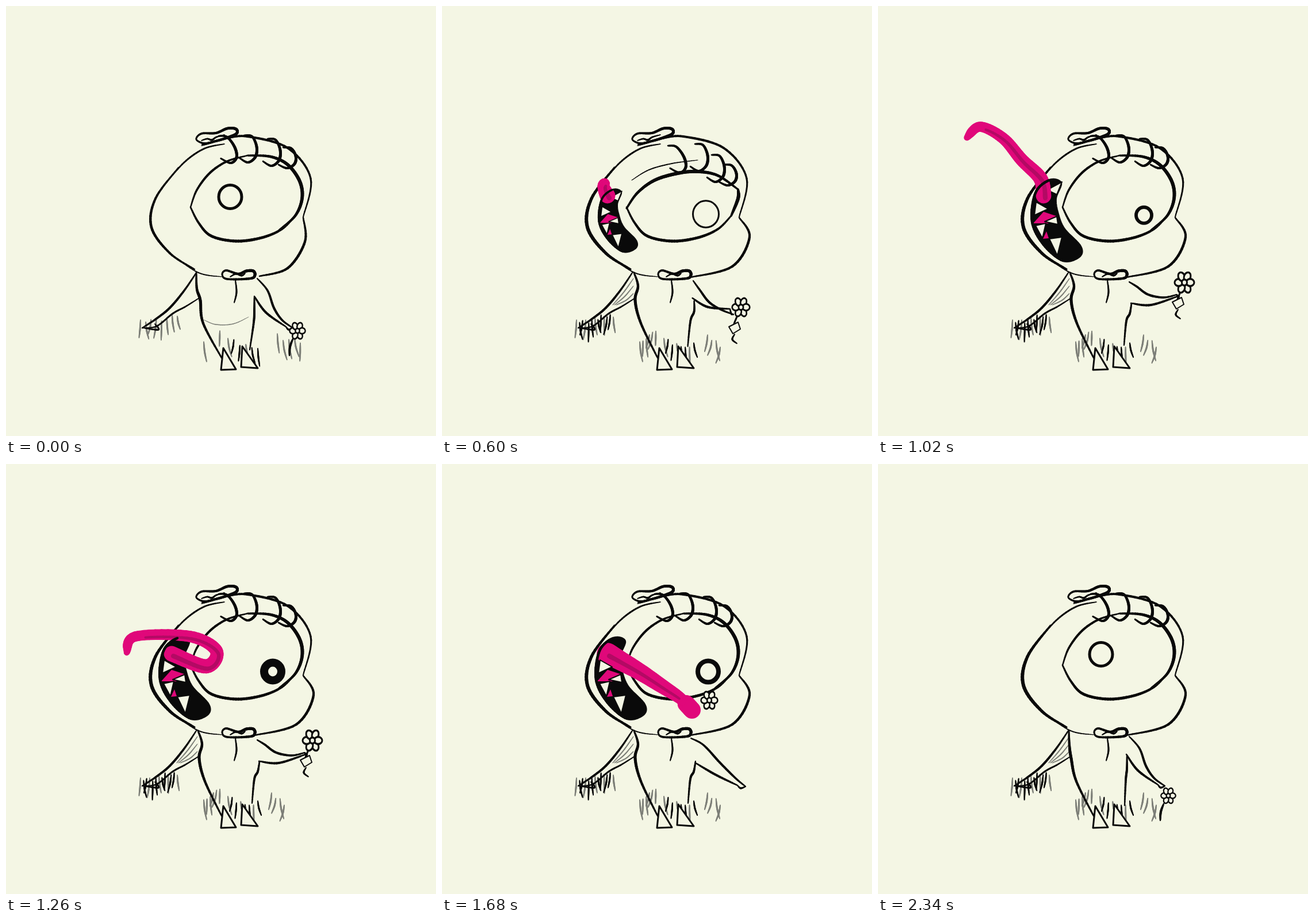
Animation of 748x748 px, one loop 2.4 s. Source, as an HTML page with a canvas:

```html
<!DOCTYPE html>
<html>
<head>
<meta charset="utf-8">
<style>
html, body { margin: 0; width: 100%; height: 100%; overflow: hidden; background: #f4f6e4; }
canvas { display: block; }
</style>
</head>
<body>
<canvas id="stage" width="748" height="748"></canvas>
<script>
const ctx = document.getElementById('stage').getContext('2d');
const LOOP = 2400, STEP = 60;
const PAPER = '#f4f6e4', INK = '#0a0a0a', GREY = '#7d7f78', PINK = '#e0087a', PLUM = '#b30a64';

const numbers = text => text.split(/[ ,]+/).map(Number);
const lerp = (a, b, k) => a + (b - a) * k;

function points(source) {
  const flat = typeof source === 'string' ? numbers(source) : source;
  return Array.from({ length: flat.length / 2 }, (_, i) => [flat[2 * i], flat[2 * i + 1]]);
}

// Eased blend of number lists, given as [time, list] pairs
function tween(keys, t) {
  const next = keys.findIndex(([time]) => time > t);
  if (next < 1) return numbers(keys[next ? keys.length - 1 : 0][1]);
  const [[t0, a], [t1, b]] = keys.slice(next - 1, next + 1);
  const u = (t - t0) / (t1 - t0), k = u * u * (3 - 2 * u), to = numbers(b);
  return numbers(a).map((v, i) => lerp(v, to[i], k));
}

// Catmull-Rom samples through the points
function curve(source) {
  const p = points(source), last = p.length - 1, steps = 10;
  const closed = p[0].join() === p[last].join();
  const out = [p[0]];
  for (let i = 0; i < last; i++) {
    const a = p[i - 1] || p[closed ? last - 1 : i];
    const b = p[i], c = p[i + 1];
    const d = p[i + 2] || p[closed ? 1 : last];
    for (let s = 1; s <= steps; s++) {
      const u = s / steps;
      out.push(b.map((v, j) => {
        const linear = c[j] - a[j];
        const square = 2 * a[j] - 5 * v + 4 * c[j] - d[j];
        const cube = 3 * (v - c[j]) + d[j] - a[j];
        return v + 0.5 * u * (linear + u * (square + u * cube));
      }));
    }
  }
  return out;
}

function ribbon(line, widthAt, color) {
  ctx.strokeStyle = color;
  for (let i = 1; i < line.length; i++) {
    ctx.lineWidth = widthAt(i / line.length);
    ctx.beginPath();
    ctx.moveTo(...line[i - 1]);
    ctx.lineTo(...line[i]);
    ctx.stroke();
  }
}

// Ink line, heavy in the middle and thin at both ends
function ink(source, width = 4, color = INK) {
  ribbon(curve(source), u => width * (0.5 + 0.5 * Math.sin(Math.PI * u)), color);
}

function fill(line, color, edge = 0) {
  ctx.beginPath();
  line.forEach(p => ctx.lineTo(...p));
  ctx.closePath();
  ctx.fillStyle = color;
  ctx.fill();
  if (!edge) return;
  ctx.strokeStyle = INK;
  ctx.lineWidth = edge;
  ctx.stroke();
}

function ring(x, y, rx, ry, width, color) {
  ctx.beginPath();
  ctx.ellipse(x, y, rx, ry, 0, 0, 7);
  if (color) { ctx.fillStyle = color; ctx.fill(); }
  ctx.strokeStyle = INK;
  ctx.lineWidth = width;
  ctx.stroke();
}

// Evenly spread blades with seeded jitter; every third one is dark when thick
function grass(x0, x1, top0, top1, count, seed, thick) {
  const random = () => (seed = seed * 16807 % 2147483647) / 2147483647;
  for (let i = 0; i < count; i++) {
    const u = i / (count - 1);
    const x = lerp(x0, x1, u), y = lerp(top0, top1, u) + random() * 10;
    const lean = random() * 16 - 8, height = 22 + random() * 14;
    ink([x, y, x + lean * 0.3, y + height / 2, x + lean, y + height], 3, thick && i % 3 ? INK : GREY);
  }
}

function drawGrass(t) {
  const thick = t >= 540;
  grass(234, 298, 546, 532, thick ? 13 : 8, 71, thick);
  grass(344, 372, 584, 562, thick ? 6 : 2, 29, false);
  grass(386, 438, 578, 586, thick ? 8 : 6, 83, true);
  if (thick) grass(462, 484, 572, 584, 4, 47, false);
  else grass(472, 512, 570, 578, 5, 13, false);
}

const chest = [[0, '331,464 332,492 338,512 343,552 375,612'], [360, '334,464 341,487 336,512 346,552 375,612'],
  [2040, '334,464 341,487 336,512 346,552 375,612'], [2340, '332,464 333,490 336,512 345,552 375,612']];
const flank = [[0, '432,505 432,528 431,550 424,598'], [360, '432,500 440,522 433,547 426,598'],
  [720, '441,517 438,535 432,548 428,590'], [1980, '441,517 438,535 432,548 428,590'], [2280, '433,506 433,530 431,550 429,594']];

// Upper edge of the arm (5 points), then its lower edge (3 points)
const arm = {
  rest: '437,474 455,495 466,525 480,546 499,560 432,505 452,533 487,558',
  slack: '437,476 447,500 459,528 475,550 494,571 431,499 449,527 478,550',
  raised: '437,480 450,488 470,502 497,507 520,502 440,517 475,520 524,504',
  reach: '433,477 455,489 483,519 510,546 528,561 441,520 475,540 514,559',
  droop: '433,476 452,492 466,522 482,541 506,568 441,516 453,538 474,557'
};
const armKeys = [[0, arm.rest], [360, arm.slack], [480, arm.slack], [720, arm.raised], [1560, arm.raised],
  [1680, arm.reach], [1920, arm.droop], [2040, arm.droop], [2280, arm.rest]];

function drawBody(t) {
  ink('331,464 310,495 285,525 260,545 237,560');
  ink('237,560 262,557 290,535 312,523 336,508', 3);
  ink('239,560 265,563 259,553', 3);
  if (t >= 540) for (let i = 0; i < 3; i++) ink([333, 474 + i * 13, 316 + i * 2, 498 + i * 7, 297 + i * 3, 520], 2, GREY);
  if (t < 240) ink('344,546 365,554 395,553 422,541', 1.5, GREY);
  ink(tween(chest, t), 5);
  ink(tween(flank, t));
  ink('399,477 401,498 397,516', 3, t >= 240 && t < 540 ? GREY : INK);
  fill(points('378,595 374,633 400,632'), PAPER, 3);
  fill(points('411,592 409,628 438,630'), PAPER, 3);

  const edges = points(tween(armKeys, t)), hand = edges[4], palm = edges[7];
  ink(edges.slice(0, 5).flat());
  ink(edges.slice(5).flat());
  ink([...palm, lerp(palm[0], hand[0], 0.4), lerp(palm[1], hand[1], 0.5) + 4, ...hand], 3);
}

const flowerKeys = [[0, '507,565,.8'], [480, '507,567,.8'], [720, '533,481,1'], [1620, '533,481,1'],
  [1680, '465,411,.85'], [1800, '305,360,.4'], [2160, '505,577,.3'], [2340, '505,577,.75']];

function drawFlower(t) {
  if (t >= 1800 && t < 2160) return;
  const [x, y, size] = tween(flowerKeys, t);
  const held = t >= 600 && t < 1680;
  if (held) {
    ink([x - 6, y + 14, x - 13, y + 31], 3);
    fill([[x - 21, y + 34], [x - 5, y + 26], [x - 1, y + 38], [x - 14, y + 46]], PAPER, 2);
    ink([x - 11, y + 47, x - 15, y + 56, x - 7, y + 63], 3);
  } else if (t < 600 || t >= 2160) {
    ink([x - 8, y + 14, x - 13, y + 28, x - 14, y + 43], 4);
  }
  ctx.save();
  ctx.translate(x, y);
  ctx.scale(size, size * 1.15);
  for (let i = 0; i < 6; i++) {
    ctx.rotate(Math.PI / 3);
    ring(10, 0, 7, 5.5, 3, PAPER);
  }
  ring(0, 0, 4.5, 4.5, 3, PAPER);
  ctx.restore();
}

function lash(x, y, lean, height) {
  const path = [0, 0, 14, 2, 22, 20, 20, 38, 7, 48, -8, 40];
  ink(path.map((v, i) => i % 2 ? y + v * height : x + v + lean * path[i + 1] / 48), 5);
}

const lashRoots = points('370,226 414,225 455,231 482,246');
const lowLashRoots = points('393,243 440,240 469,259 490,276');

const chin = [[0, '441,470 490,456 520,410 517,368'], [240, '432,472 505,453 535,402 517,368']];

// x, y, radius and line width
const pupil = [[0, '390,332,20,5'], [120, '390,332,20,5'], [360, '456,359,32,3'], [480, '456,359,32,3'],
  [720, '462,365,13,3'], [960, '462,365,13,3'], [1140, '464,361,15,14'], [1380, '464,361,15,14'],
  [1680, '463,361,18,8'], [1920, '464,361,19,5'], [2100, '464,361,19,5'], [2280, '388,331,20,5']];

function drawHead(t) {
  const lidded = t >= 600 && t < 1020;
  ink('380,240 345,248 310,272 275,312', 3);
  ink('300,281 260,335 253,385 285,430 328,458', t < 540 ? 4.5 : 6);
  ink('290,434 335,464 375,471', 2);
  ink('341,241 380,231 420,227 490,247 530,300 517,367', 4);
  ink(tween(chin, t), 4.5);

  ink('321,350 335,377 357,400 400,409 445,403 480,388 503,365', 5);
  if (lidded) {
    ink('321,352 340,325 370,303 410,291 445,288 480,295 515,319', 6);
    ink('503,365 515,335 515,319', 6);
    ink('330,303 360,285 400,274 445,268', 2);
  } else {
    ink('321,350 332,320 355,290 385,270 420,260', 4);
    ink('420,260 460,262 490,276 511,305 515,335 503,365 475,390', 6);
  }
  (lidded ? lowLashRoots : lashRoots).forEach(([x, y], i) => lash(x, y, i ? 0 : 14, i < 3 ? 0.98 : 0.75));

  ink('331,232 340,222 365,221 385,213 400,214 401,222 385,229 365,235 345,239 331,232', 5);
  ink('340,234 350,231 358,233 366,228 380,224', 3);
  ink('340,243 362,237', 2);
  ink('376,467 383,460 404,466 418,461 430,461 433,468 425,474 385,475 376,467', 5);
  ink('390,471 400,466 410,469 416,465', 3);

  const [x, y, radius, width] = tween(pupil, t);
  ring(x, y, radius, radius * 1.03, width);
}

const wideMouth = '298,303 318,308 309,335 313,362 324,388 352,418 350,436 322,443 288,415 268,375 274,325 298,303';
const shutMouth = '300,300 307,318 313,340 318,365 326,385 346,410 349,430 332,441 302,422 283,388 276,345 300,300';
const mouth = [[1680, wideMouth], [1860, shutMouth]];
const mouthSize = [[480, '.1,.1'], [660, '1,1'], [1920, '1,1'], [2160, '.75,.9'], [2280, '.1,.1']];
const wideTeeth = ['272,364 275,341 296,353', '290,375 311,366 313,380', '274,382 292,378 286,404', '298,405 320,402 312,434'];
const shutTeeth = ['283,324 300,303 303,321', '281,335 305,347 284,373', '286,378 304,384 292,397', '300,412 324,406 325,435'];
const widePink = ['270,378 288,358 312,366 296,378', '287,405 293,392 297,404'];
const shutPink = ['283,325 297,322 299,338', '284,376 305,348 312,376', '293,400 306,384 305,410'];

// Centre line after the fixed root
const ROOT = [288, 330];
const tongue = [
  [540, '287,328 286,326 285,324 284,322 283,320'],
  [780, '276,310 262,278 258,248 275,236 291,252'],
  [960, '275,300 245,260 215,215 180,180 155,190'],
  [1080, '290,300 255,275 220,245 175,240 154,268'],
  [1260, '348,352 366,325 320,300 225,300 210,328'],
  [1440, '340,360 400,355 450,380 510,430 548,478'],
  [1620, '345,365 400,392 450,425 505,460 536,478'],
  [1680, '310,342 345,362 385,388 415,408 435,428'],
  [1800, '291,335 293,345 296,355 299,365 300,372']];

function drawTongue(t) {
  const line = curve([...ROOT, ...tween(tongue, t)]);
  const grip = t >= 1560;
  const widthAt = u => grip
    ? (u > 0.88 ? 30 : 38 - 22 * u)
    : (27 - 12 * u) * Math.min(1, (1.15 - u) * 4);
  ribbon(line, widthAt, PINK);
  ribbon(line.slice(0, -12).map(([x, y]) => [x + 3, y + 4]), u => 8 - 4 * u, PLUM);
}

function inMouth(t, paint) {
  const [sx, sy] = tween(mouthSize, t);
  ctx.save();
  ctx.translate(290, 375);
  ctx.scale(sx, sy);
  ctx.translate(-290, -375);
  paint();
  ctx.restore();
}

function drawMouth(t) {
  if (t < 540 || t >= 2280) return;
  const outline = curve(tween(mouth, t)), shut = t >= 1800;
  inMouth(t, () => {
    fill(outline, INK, 4);
    (shut ? shutPink : widePink).forEach(p => fill(points(p), PINK));
    if (t < 1140) fill(points('294,320 320,306 311,328'), PAPER, 2);
  });
  if (t < 1860) drawTongue(t);
  inMouth(t, () => {
    (shut ? shutTeeth : wideTeeth).forEach(p => fill(points(p), PAPER, 2));
    ribbon(outline.slice(70), () => 4.5, INK);
  });
}

function draw(t) {
  ctx.fillStyle = PAPER;
  ctx.fillRect(0, 0, 748, 748);
  ctx.lineCap = ctx.lineJoin = 'round';
  drawGrass(t);
  drawBody(t);
  drawHead(t);
  drawFlower(t);
  drawMouth(t);
}

let shown = -1;
function tick() {
  const t = Math.floor(performance.now() % LOOP / STEP) * STEP;
  if (t !== shown) draw(shown = t);
  requestAnimationFrame(tick);
}
tick();
</script>
</body>
</html>
```
